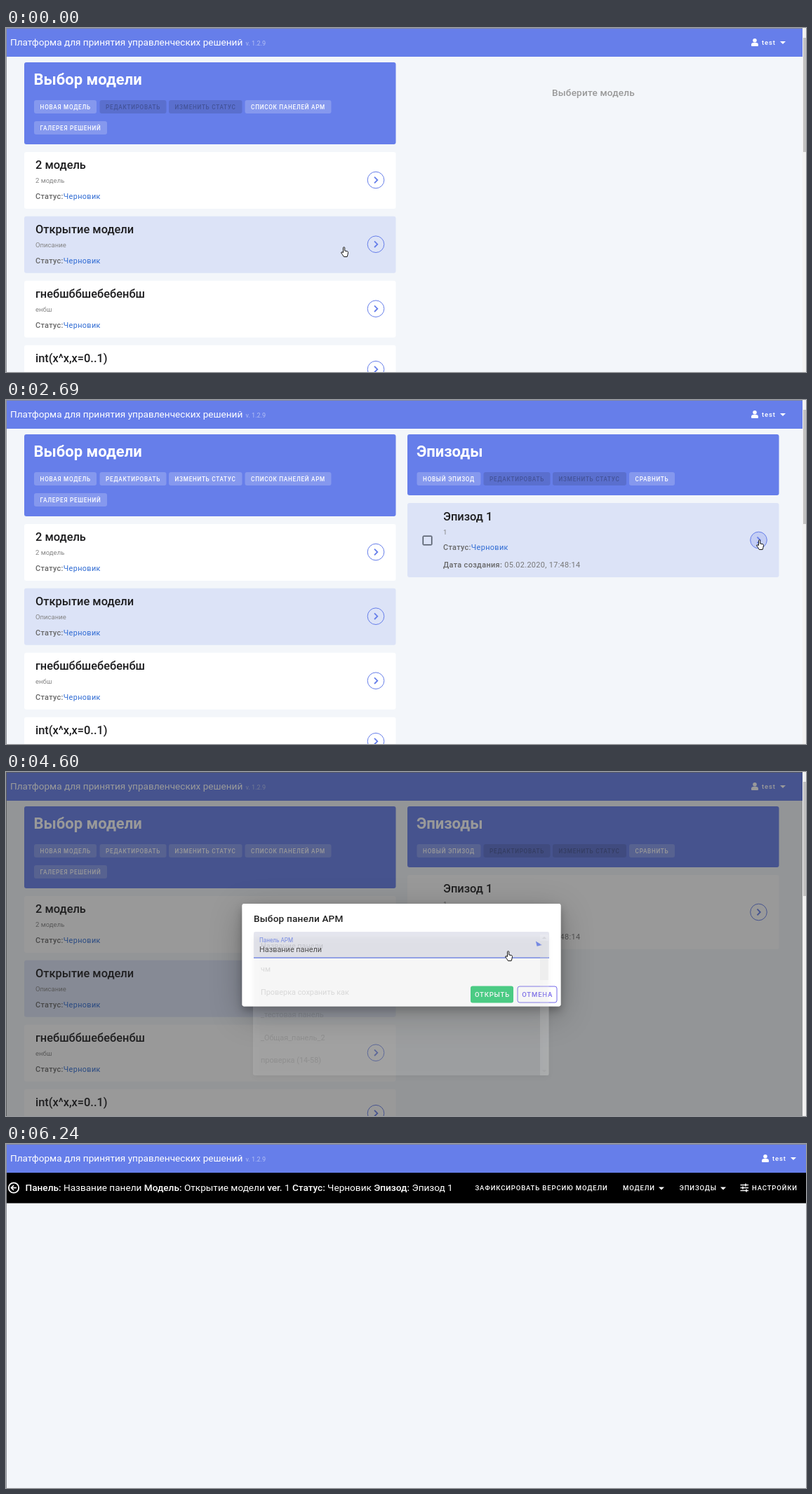
Recreate the animation shown at these times as an HTML page with a canvas. Size 1140 by 491 pixels, loop 6550 ms.

```html
<!DOCTYPE html>
<html lang="ru">
<head>
<meta charset="utf-8">
<style>
html, body { margin: 0; width: 100%; height: 100%; overflow: hidden; background: #f3f6fa; }
canvas { display: block; width: 100%; height: 100%; }
</style>
</head>
<body>
<canvas id="stage" width="1140" height="491"></canvas>
<script>
const c = document.getElementById('stage').getContext('2d');
const LOOP = 6550;
const BLUE = '#667eea', PALE = '#dce3f7', PAGE = '#f3f6fa';

const STEPS = [0, 560, 700, 820, 1070, 1220, 1340, 1480, 1600, 1750, 1870, 2000, 2120,
  2270, 2420, 2570, 2690, 2840, 2970, 3120, 3260, 3400, 3520, 3650, 3810, 3930, 4050,
  4210, 4360, 4480, 4600, 4740, 4860, 4980, 5140, 5290, 5440, 5560, 5700, 5820, 5950, 6090, 6240];

// Pointer tip: time, x, y
const PATH = [[0, 481, 312], [560, 481, 312], [820, 532, 309], [1070, 552, 298], [1220, 610, 265],
  [1340, 685, 225], [1480, 765, 200], [1600, 835, 182], [2120, 1066, 198], [2270, 1073, 198],
  [2420, 1073, 199], [2970, 1073, 199], [3120, 900, 192], [3260, 772, 205], [3650, 737, 240],
  [3810, 733, 239], [4050, 733, 239], [4210, 711, 250], [4600, 715, 255], [4980, 692, 312],
  [5140, 692, 315], [5290, 692, 319], [5440, 772, 461], [5560, 745, 339], [5950, 698, 318], [6090, 723, 316]];

const HAND = new Path2D('M3.5 8.5V1.8a1.1 1.1 0 0 1 2.2 0V6l3.6.7q1.3.4 1.2 1.8l-.6 3.3-.8 2.7H4.4L2.6 11.6.7 9Q.6 7.5 2 7.8Z');
const ARROW = new Path2D('M.5.5V11L3 8.8l1.7 3.7 1.7-.7L4.8 8.2H8Z');

const ramp = (t, from, to) => Math.min(1, Math.max(0, (t - from) / (to - from)));
const mix = (a, b, p) => a + (b - a) * p;

function box(x, y, w, h, fill, r = 0, stroke) {
  c.beginPath();
  c.roundRect(x, y, w, h, r);
  if (fill) { c.fillStyle = fill; c.fill(); }
  if (stroke) { c.strokeStyle = stroke; c.lineWidth = 1; c.stroke(); }
}

// Draws text and returns the x where it ends.
function text(s, x, y, size, color, weight = 400, spacing = 0) {
  c.font = `${weight} ${size}px Roboto, sans-serif`;
  c.letterSpacing = spacing * size + 'px';
  c.fillStyle = color;
  c.fillText(s, x, y);
  return x + c.measureText(s).width;
}

const caps = (s, x, y, color = '#fff', size = 9.52) => text(s, x, y, size, color, 500, .0893);

function line(points, color, width) {
  c.beginPath();
  points.forEach(([x, y]) => c.lineTo(x, y));
  c.strokeStyle = color;
  c.lineWidth = width;
  c.stroke();
}

function caret(x, y, w, color, turn = 0) {
  c.save();
  c.translate(x, y);
  c.rotate(turn);
  c.beginPath();
  c.moveTo(-w, -w / 2);
  c.lineTo(w, -w / 2);
  c.lineTo(0, w / 2);
  c.fillStyle = color;
  c.fill();
  c.restore();
}

function disc(x, y, r, fill, stroke, width = 1) {
  c.beginPath();
  c.arc(x, y, r, 0, 7);
  if (fill) { c.fillStyle = fill; c.fill(); }
  if (stroke) { c.strokeStyle = stroke; c.lineWidth = width; c.stroke(); }
}

function frameEdge(w) {
  box(0, 0, w, 1, '#858a9c');
  box(0, 0, 1, 491, '#8d9096');
}

function appBar(w) {
  box(0, 0, w, 41, BLUE);
  text('Платформа для принятия управленческих решений', 6, 25, 13.6, '#fff');
  text('v. 1.2.9', 341.5, 25, 9.1, 'rgba(255,255,255,.5)');
  disc(w - 68, 17.7, 2.8, '#fff');
  box(w - 73, 21, 10, 5, '#fff', [3, 3, 1, 1]);
  caps('test', w - 58, 24);
  caret(w - 28, 21, 4, '#fff');
}

function chip(s, x, y, w, on = true) {
  box(x, y, w, 19, on ? 'rgba(255,255,255,.2)' : 'rgba(0,0,0,.12)', 3);
  caps(s, x + 8.6, y + 12.8, on ? '#fff' : 'rgba(0,0,0,.26)', 8.16);
}

function roundButton(x, y, fill) {
  disc(x, y, 11.8, fill, BLUE);
  line([[x - 2, y - 4.3], [x + 2.3, y], [x - 2, y + 4.3]], BLUE, 1.8);
}

function status(x, y) {
  const end = text('Статус:', x, y, 10.88, '#666', 500, .03125);
  text('Черновик', end, y, 10.88, '#2f6bd3', 400, .03125);
}

function modelCard(y, title, note, selected, buttonY = 40) {
  box(26, y, 529.5, 81, selected ? PALE : '#fff', 3);
  text(title, 42, y + 24.3, 16.4, '#1d1d1f', 500);
  text(note, 42, y + 44.3, 9.52, '#858585');
  status(42, y + 67);
  roundButton(527, y + buttonY);
}

function episodes(t) {
  const hover = t >= 1340 && t < 2840;
  box(572, 49, 529.5, 87, BLUE, 3);
  text('Эпизоды', 585, 81, 22, '#fff', 700);
  chip('НОВЫЙ ЭПИЗОД', 585.5, 103, 91);
  chip('РЕДАКТИРОВАТЬ', 680.5, 103, 95, false);
  chip('ИЗМЕНИТЬ СТАТУС', 779, 103, 105, false);
  chip('СРАВНИТЬ', 888, 103, 65);
  box(572, 147, 529.5, 106, hover ? PALE : '#fff', 3);
  if (t < 700) return;
  box(594, 194, 13, 13, null, 1, '#4d5563');
  box(594.6, 194.6, 11.8, 11.8, null, 1, '#4d5563');
  text('Эпизод 1', 623, 171.8, 16.4, '#1d1d1f', 500);
  text('1', 623, 192, 9.52, '#858585');
  status(623, 213.8);
  const end = text('Дата создания: ', 623, 239, 10.88, '#666', 500, .03125);
  text('05.02.2020, 17:48:14', end, 239, 10.88, '#777', 400, .03125);
  roundButton(1072.5, 200, t >= 2570 && t < 2840 ? 'rgba(102,126,234,.2)' : null);
}

function modelsPage(t) {
  const picked = t >= 560;
  appBar(1135);
  box(26, 49, 529.5, 117, BLUE, 3);
  text('Выбор модели', 39.5, 81, 22, '#fff', 700);
  chip('НОВАЯ МОДЕЛЬ', 40, 103, 89);
  chip('РЕДАКТИРОВАТЬ', 133.5, 103, 95, picked);
  chip('ИЗМЕНИТЬ СТАТУС', 232, 103, 104.5, picked);
  chip('СПИСОК ПАНЕЛЕЙ АРМ', 340.5, 103, 123);
  chip('ГАЛЕРЕЯ РЕШЕНИЙ', 40, 133, 104);
  modelCard(177, '2 модель', '2 модель');
  modelCard(268.7, 'Открытие модели', 'Описание', true);
  modelCard(360.7, 'гнебшббшебебенбш', 'енбш');
  modelCard(452.7, 'int(x^x,x=0..1)', '', false, 34.5);
  if (picked) episodes(t);
  else text('Выберите модель', 778, 96.8, 13.6, '#999', 500, .0125);
  frameEdge(1135);
}

function shadow(alpha, blur, y) {
  c.shadowColor = `rgba(0,0,0,${alpha})`;
  c.shadowBlur = blur;
  c.shadowOffsetY = y;
}

function field(t) {
  const focus = ramp(t, 3760, 3925);
  const turn = focus * (1 - ramp(t, 4480, 4626));
  const active = t >= 3930;
  box(353, 228, 421, 38, `rgba(0,0,0,${t >= 3520 && t < 4740 ? .12 : .06})`, [3, 3, 0, 0]);
  if (t >= 4600) box(353, 228, 421, 38, 'rgba(235,238,255,.5)', [3, 3, 0, 0]);
  box(353, 265, 421, 1, t >= 3520 ? '#333' : '#8c8c8c');
  box(563.5 - 210.5 * focus, 264.5, 421 * focus, 1.5, active ? BLUE : '#3c4160');
  text('Панель АРМ', 361, mix(250.6, 243.4, focus), mix(10.88, 8.16, focus),
    active ? BLUE : focus ? '#6f7590' : '#757575');
  if (t >= 4480) text('Название панели', 361, 257, 10.88, '#333');
  caret(758, 246.5, 5.3, active ? BLUE : focus ? '#66709c' : '#666', turn * Math.PI);
}

function dialog(t, p) {
  const scale = 1 - .58 * (1 - p), ready = t >= 4480;
  c.save();
  c.globalAlpha = p;
  c.translate(563.5, 261.5);
  c.scale(scale, scale);
  c.translate(-563.5, -261.5);
  shadow(.28, 46, 12);
  box(336.5, 188, 454, 146.5, '#fff', 3);
  shadow(.25, 12, 6);
  box(336.5, 188, 454, 146.5, '#fff', 3);
  shadow(0, 0, 0);
  text('Выбор панели АРМ', 353, 214, 13.6, '#222', 500, .0125);
  field(t);
  box(662, 305.5, 61, 24, ready ? '#30cb76' : '#e0e0e0', 3);
  if (t >= 4980) box(662, 305.5, 61, 24, `rgba(255,255,255,${t >= 5290 ? .24 : .1})`, 3);
  caps('ОТКРЫТЬ', 668, 320.6, ready ? '#fff' : 'rgba(0,0,0,.26)');
  box(729, 306, 56, 23, null, 3, '#7468ea');
  caps('ОТМЕНА', 735.3, 320.6, '#7262ee');
  c.restore();
}

function menu(t) {
  const alpha = ramp(t, 3830, 4050) * (1 - ramp(t, 4480, 4620));
  if (!alpha) return;
  c.save();
  c.globalAlpha = alpha;
  shadow(.3, 7, 3);
  box(352, 232, 422, 201, '#fff', 3);
  shadow(0, 0, 0);
  if (t >= 4210) box(352, 232, 409, 33, 'rgba(0,0,0,.06)');
  ['Название панели', 'чм', 'Проверка сохранить как', '_тестовая панель', '_Общая_панель_2', 'проверка (14-58)']
    .forEach((s, i) => text(s, 363, 252.2 + i * 32.65, 10.88, '#222'));
  box(761, 232, 12, 201, '#f1f1f1');
  box(761, 241, 12, 56, '#c1c1c1');
  caret(767, 236.5, 3, '#777', Math.PI);
  caret(767, 427, 3, '#777');
  c.restore();
}

function panelPage(t) {
  appBar(1140 + 10);
  c.fillStyle = BLUE;
  c.fillRect(1070, 1, 70, 39);
  disc(1082, 17.7, 2.8, '#fff');
  box(1077, 21, 10, 5, '#fff', [3, 3, 1, 1]);
  caps('test', 1092, 24);
  caret(1122, 21, 4, '#fff');

  box(0, 41, 1140, 43.5, '#000');
  disc(11, 62.5, 7.2, null, '#fff', 1.8);
  line([[15, 62.5], [7.5, 62.5]], '#fff', 1.7);
  line([[11, 59], [7.5, 62.5], [11, 66]], '#fff', 1.7);
  const named = t >= 5560, loaded = t >= 5700;
  let x = 27.5;
  [['Панель: ', named && 'Название панели '], ['Модель: ', loaded && 'Открытие модели '],
    ['ver. ', loaded && '1 '], ['Статус: ', loaded && 'Черновик '], ['Эпизод: ', 'Эпизод 1']]
    .forEach(([label, value]) => {
      x = text(label, x, 66.8, 13.6, '#fff', 500);
      if (value) x = text(value, x, 66.8, 13.6, '#fff');
    });
  if (loaded) caps('ЗАФИКСИРОВАТЬ ВЕРСИЮ МОДЕЛИ', 668.5, 65.8);
  caps('МОДЕЛИ', 879, 65.8);
  caret(934, 63.5, 4, '#fff');
  caps('ЭПИЗОДЫ', 959.5, 65.8);
  caret(1022, 63.5, 4, '#fff');
  [[58.5, 1054], [62.5, 1050], [66.5, 1055]].forEach(([y, knob]) => {
    line([[1046.5, y], [1058, y]], '#fff', 1.4);
    line([[knob, y - 2], [knob, y + 2]], '#fff', 1.5);
  });
  caps('НАСТРОЙКИ', 1063, 65.8);
  frameEdge(1140);
}

function pointer(t) {
  if (t >= 6240) return;
  const i = Math.max(1, PATH.findIndex(k => k[0] >= t));
  const [a, b] = [PATH[i - 1], PATH[i]];
  const p = ramp(t, a[0], b[0]);
  const hand = t < 1220 || (t >= 1340 && t < 2840) || (t >= 3520 && t < 5440);
  c.save();
  c.translate(Math.round(mix(a[1], b[1], p)) - (hand ? 4 : 0), Math.round(mix(a[2], b[2], p)));
  const shape = hand ? HAND : ARROW;
  c.fillStyle = '#fff';
  c.fill(shape);
  c.strokeStyle = '#111';
  c.lineWidth = 1;
  c.stroke(shape);
  c.restore();
}

function draw(now) {
  const time = now % LOOP;
  const t = STEPS.findLast(s => s <= time);
  box(0, 0, 1140, 491, PAGE);
  if (t < 5440) {
    const p = ramp(t, 2755, 2855);
    modelsPage(t);
    if (p) {
      box(0, 0, 1135, 491, `rgba(33,33,33,${.46 * p})`);
      dialog(t, p);
      menu(t);
    }
    box(1135, 0, 5, 491, '#f1f1f1');
    box(1136, 14, 4, 163, '#c1c1c1');
  } else {
    panelPage(t);
    if (t < 5560) {
      box(0, 0, 1140, 41, 'rgba(33,33,33,.08)');
      box(0, 84.5, 1140, 407, 'rgba(33,33,33,.08)');
    }
  }
  pointer(t);
}

const start = performance.now();
function tick() {
  draw(performance.now() - start);
  requestAnimationFrame(tick);
}
tick();
</script>
</body>
</html>
```
